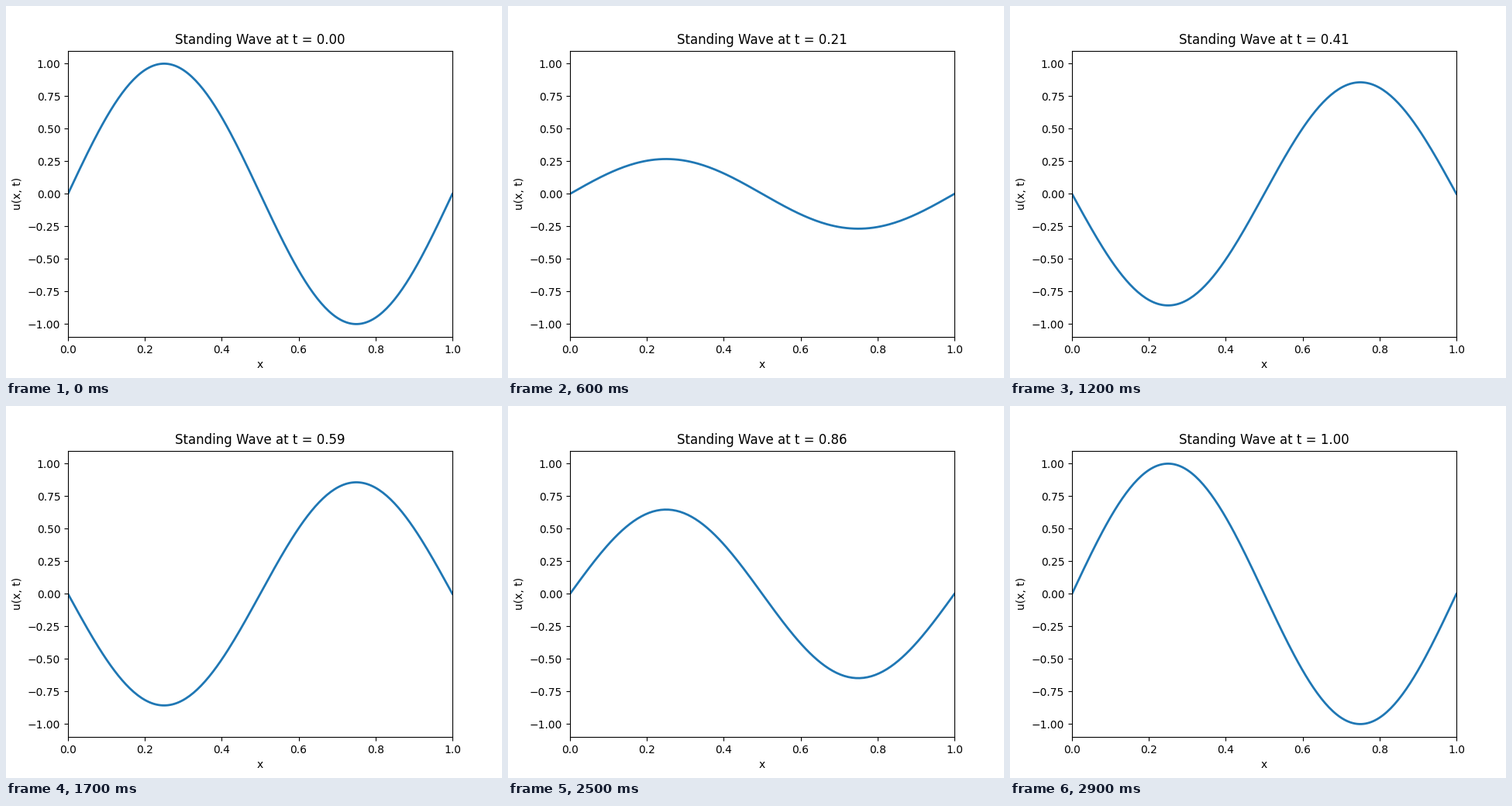
Animation, 640 px wide and 480 px high, one loop 3 s. Source, as a matplotlib script:

```python
import numpy as np
import matplotlib.pyplot as plt
from matplotlib.animation import FuncAnimation

FRAMES = 30
INTERVAL = 100  # ms

x = np.linspace(0, 1, 200)
times = np.linspace(0, 1, FRAMES)


def wave(t):
    return np.sin(2 * np.pi * x) * np.cos(2 * np.pi * t)


fig, ax = plt.subplots(figsize=(6.4, 4.8), dpi=100)
line, = ax.plot(x, wave(0), lw=2, color="#1f77b4")
ax.set_xlim(0, 1)
ax.set_ylim(-1.1, 1.1)
ax.set_xlabel("x")
ax.set_ylabel("u(x, t)")
title = ax.set_title("Standing Wave at t = 0.00")


def update(i):
    t = times[i]
    line.set_ydata(wave(t))
    title.set_text(f"Standing Wave at t = {t:.2f}")
    return line, title


anim = FuncAnimation(fig, update, frames=FRAMES, interval=INTERVAL,
                     repeat=True, repeat_delay=0, blit=False)

plt.show()
```
